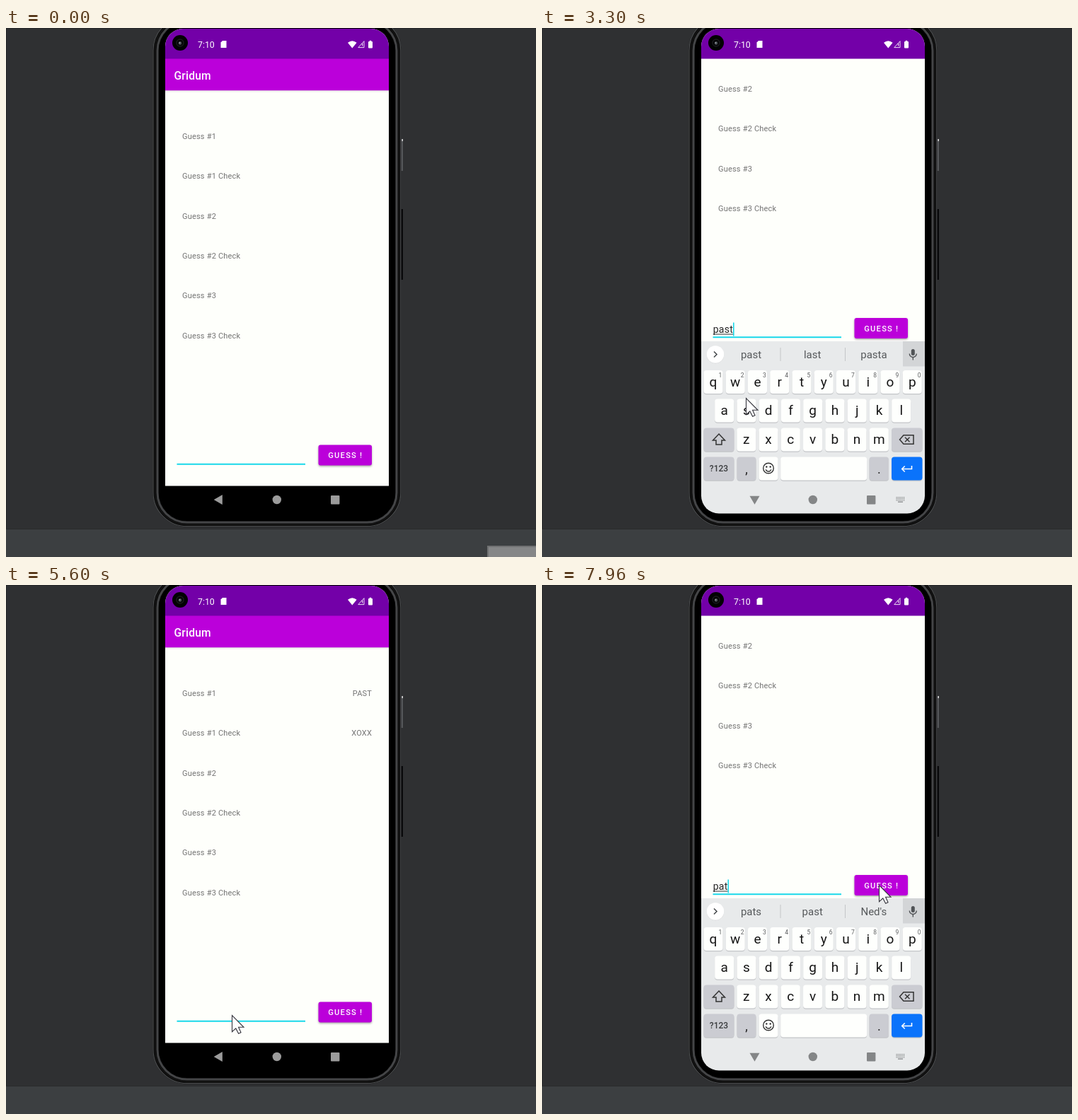
An HTML page with a canvas for the animation above (8 s loop, 749 px wide and 748 px high).

```html
<!DOCTYPE html>
<html lang="en">
<head>
<meta charset="utf-8">
<title>Word game on a phone</title>
<style>
html, body { margin: 0; width: 100%; height: 100%; overflow: hidden; background: #2f3032; }
canvas { display: block; width: 749px; height: 748px; }
</style>
</head>
<body>
<canvas id="stage" width="749" height="748"></canvas>
<script>
const LOOP = 8000, PAN = 179.5, PAN_MS = 250, KB_MS = 310, KB_TOP = 443, KB_H = 245;
const PURPLE = '#bb00da';
const stage = document.getElementById('stage').getContext('2d');
const kbCanvas = document.createElement('canvas');
kbCanvas.width = 749;
kbCanvas.height = KB_H;
const kbCtx = kbCanvas.getContext('2d');
let g = stage;

// Stepped state: [time, value]
const typed = [[0, ''], [1400, 'p'], [1500, 'pa'], [1870, 'pas'], [3070, 'past'],
  [4130, ''], [6410, 'p'], [6480, 'pa'], [6720, 'pat']];
const composed = [[0, 0], [1650, 2], [1870, 3], [3300, 4], [4130, 0], [6520, 2], [6920, 3]];
const caret = [[0, 0], [320, 1], [820, 0], [1180, 1], [2410, 0], [3070, 1], [3600, 0], [4130, 1],
  [4650, 0], [5120, 1], [5600, 0], [6410, 1], [7450, 0], [7940, 1]];
const strip = [[0, 'tools'], [1650, 'pa|past|part'], [1870, 'pas|past|part'], [2120, 'past|pass|pas'],
  [3300, 'past|last|pasta'], [4130, ''], [4420, 'tools'], [6410, ''], [6520, 'pa|past|part'],
  [6920, 'pat|past|part'], [7180, "pats|past|Ned's"]];
// Pointer moves: start, end, from, to
const moves = [[30, 850, 752, 746, 253, 596], [2410, 2700, 253, 596, 288, 523],
  [3600, 3930, 288, 523, 462, 431], [4420, 5220, 462, 431, 319, 608], [7410, 7960, 319, 608, 476, 424]];
const taps = [[1010, 1250, 253, 596], [3990, 4130, 462, 431], [5630, 5760, 319, 608]];
const shows = [1400, 5757], HIDE = 4177, HIDDEN = 4420;

const clamp = v => Math.max(0, Math.min(1, v));
const ramp = (t, a, b) => clamp((t - a) / (b - a));
const smooth = v => v * v * (3 - 2 * v);
const half = v => Math.round(v * 2) / 2;
const at = (list, t) => list.reduce((v, s) => t >= s[0] ? s[1] : v, list[0][1]);

function rect(x, y, w, h, color, r = 0) {
  g.fillStyle = color;
  g.beginPath();
  g.roundRect(x, y, w, h, r);
  g.fill();
}
function disc(x, y, r, color) {
  g.fillStyle = color;
  g.beginPath();
  g.arc(x, y, r, 0, 7);
  g.fill();
}
function poly(points, fill, stroke, width = 1, closed = true) {
  g.beginPath();
  for (let i = 0; i < points.length; i += 2) g.lineTo(points[i], points[i + 1]);
  if (closed) g.closePath();
  if (fill) { g.fillStyle = fill; g.fill(); }
  if (stroke) { g.strokeStyle = stroke; g.lineWidth = width; g.stroke(); }
}
function outline(x, y, w, h, r, color, width) {
  g.strokeStyle = color;
  g.lineWidth = width;
  g.beginPath();
  g.roundRect(x, y, w, h, r);
  g.stroke();
}
function ring(x, y, r, color, width, a = 0, b = 7) {
  g.strokeStyle = color;
  g.lineWidth = width;
  g.beginPath();
  g.arc(x, y, r, a, b);
  g.stroke();
}
function text(s, x, y, size, color, { weight = 400, align = 'left', gap = 0 } = {}) {
  g.font = `${weight} ${size}px Roboto, sans-serif`;
  g.letterSpacing = gap + 'px';
  g.textAlign = align;
  g.fillStyle = color;
  g.fillText(s, x, y);
}

function drawPhone() {
  rect(0, 0, 749, 748, '#2f3032');
  rect(0, 0, 749, 1, '#252628');
  rect(0, 0, 1, 709, '#252628');
  rect(0, 709, 749, 39, '#3c3f41');
  rect(0, 708, 749, 1, '#292b2c');
  rect(558, 157, 3, 45, '#55575a');
  rect(559.5, 157, 1.5, 3, '#ddd');
  rect(558, 256, 3, 100, '#08080a');
  rect(207.3, -17, 351.2, 722.5, '#0b0b0b', 49);
  outline(208, -16.3, 349.8, 721, 48, '#4b4d4f', 1.2);
  outline(210.5, -14, 345, 716, 46, '#131313', 2);
  outline(214, -10, 338, 709, 42, '#444547', 3);
  rect(216, -8, 334, 705, '#000', 40);
}

function drawStatus() {
  rect(225, 0, 316, 43.6, '#7300a8');
  disc(246, 21, 11, '#020203');
  ring(246, 21, 5, '#18191c', 1.5);
  disc(246, 21.5, 2.4, '#41464b');
  disc(245.5, 21, 1, '#9a9fa4');
  text('7:10', 271, 28, 12.3, '#fff');
  poly([306, 18, 311.5, 18, 311.5, 28, 303.5, 28, 303.5, 20.5], '#fff');
  g.fillStyle = '#fff';
  g.beginPath();
  g.moveTo(489.3, 28.5);
  g.lineTo(483, 20.8);
  g.quadraticCurveTo(489.3, 15.6, 495.6, 20.8);
  g.fill();
  poly([497.8, 27.6, 506, 27.6, 506, 18.6], null, '#eadcf2', 1);
  rect(503.2, 22, 1, 3.5, '#fff');
  rect(512, 19, 6, 9.5, '#fff', 1);
  rect(513.7, 17.8, 2.6, 2, '#fff');
}

function drawApp(t, pan) {
  const value = at(typed, t), grey = '#747474';
  g.save();
  g.translate(0, pan);
  rect(225, 0, 316, 647.5, '#fefffb');
  rect(225, 88, 316, 1.3, '#dcd9dc');
  rect(225, 89.3, 316, 1.5, '#f3f2f1');
  rect(225, 43, 316, 45.3, PURPLE);
  text('Gridum', 237.5, 72.5, 15.6, '#fff', { weight: 500, gap: .2 });
  const rowY = i => 156.7 + i * 56.4;
  for (let i = 0; i < 6; i++) {
    const label = `Guess #${(i >> 1) + 1}${i % 2 ? ' Check' : ''}`;
    text(label, 249, rowY(i), 11, grey, { gap: .2 });
  }
  if (t >= 4130) {
    text('PAST', 517, rowY(0), 11, grey, { align: 'right', gap: .2 });
    text('XOXX', 517, rowY(1), 11, grey, { align: 'right', gap: .2 });
  }
  rect(241.5, 615.8, 181.5, 2, '#18d8ea');
  text(value, 241.7, 610.3, 14, '#272727', { gap: .3 });
  const width = n => n ? g.measureText(value.slice(0, n)).width : 0;
  rect(241.7, 612, width(at(composed, t)), 1, '#333');
  if (at(caret, t)) rect(241.5 + width(value.length), 596, 1.6, 19, '#18d8ea');
  g.save();
  g.shadowColor = 'rgba(0,0,0,.35)';
  g.shadowBlur = 3;
  g.shadowOffsetY = 1.5;
  rect(441.5, 589.5, 75.5, 29, PURPLE, 3);
  g.restore();
  const ripple = ramp(t, 4000, 4100) * (1 - ramp(t, 4250, 4500));
  if (ripple) rect(441.5, 589.5, 75.5, 29, `rgba(255,255,255,${.2 * ripple})`, 3);
  text('GUESS !', 455.3, 608.3, 11.2, '#fff', { weight: 500, gap: 1.2 });
  g.restore();
}

function key(x, cy, w, color = '#fefffd') {
  rect(x, cy - 15, w, 32.7, '#c3c5c8', 4);
  rect(x, cy - 16.5, w, 33, color, 4);
}
function letters(row, x0, cy, digits) {
  [...row].forEach((c, i) => {
    const cx = x0 + i * 31.25;
    key(cx - 13.5, cy, 27);
    text(c, cx, cy + 6, 19, '#161616', { align: 'center' });
    if (digits) text((i + 1) % 10, cx + 10, cy - 6.5, 8.5, '#5c5e60', { align: 'center' });
  });
}

function drawTools(y, ink) {
  outline(280, y - 6, 12.5, 12.5, 2, ink, 1.5);
  disc(284, y - 1.5, 1.1, ink);
  disc(288.7, y - 1.5, 1.1, ink);
  ring(286.3, y, 3.2, ink, 1.2, .3, 2.8);
  poly([288, y + 7.5, 288, y + 2.5, 293.5, y + 2.5], ink);
  text('GIF', 331.5, y + 4.2, 11.5, ink, { weight: 700, align: 'center', gap: .7 });
  outline(371.7, y - 5.8, 11.6, 12.3, 1, ink, 1.4);
  rect(374.5, y - 7.5, 6, 4, ink, 1);
  for (const d of [-1, 1.3, 3.6]) rect(374, y + d, 7, 1.1, ink);
  ring(423, y, 4, ink, 2.8);
  for (let i = 0; i < 6; i++) {
    const a = i * Math.PI / 3 + Math.PI / 6, c = Math.cos(a), s = Math.sin(a);
    poly([423 + c * 4, y + s * 4, 423 + c * 7, y + s * 7], null, ink, 3, false);
  }
  rect(450.5, y - 9, 1, 18, '#c3c5c8');
  for (const d of [-5, 0, 5]) disc(479 + d, y, 1.6, ink);
}

function drawKeyboard(t) {
  const ink = '#505356', mode = at(strip, t), y = 18.5, dark = '#cbccd2';
  g = kbCtx;
  g.clearRect(0, 0, 749, KB_H);
  rect(225, 0, 316, KB_H, '#e8eaeb');
  rect(510, 0, 31, 35.5, '#d3d5d7');
  rect(521.8, y - 7.5, 5, 9, ink, 2.5);
  ring(524.3, y - 1, 5, ink, 1.4, 0, Math.PI);
  rect(523.6, y + 4, 1.4, 4, ink);
  disc(245, y + .7, 12.2, '#d6d8da');
  disc(245, y, 12.2, '#fff');
  const dir = mode === 'tools' ? 1 : -1;
  poly([245 + 2 * dir, y - 4, 245 - 2 * dir, y, 245 + 2 * dir, y + 4], null, '#44474a', 1.5, false);
  if (mode === 'tools') drawTools(y, ink);
  else if (mode) {
    mode.split('|').forEach((w, i) =>
      text(w, 295.5 + i * 86.7, y + 5.6, 15, '#56595b', { align: 'center' }));
    rect(336.5, 9, 1, 19, '#c3c5c8');
    rect(428, 9, 1, 19, '#c3c5c8');
  }
  letters('qwertyuiop', 242, 57.5, true);
  letters('asdfghjkl', 257.7, 98);
  letters('zxcvbnm', 288.8, 139);

  key(228.5, 139, 43, dark);
  poly([250, 131, 258.5, 140, 254, 140, 254, 146, 246, 146, 246, 140, 241.5, 140], null, '#333', 1.5);
  key(494, 139, 43.5, dark);
  poly([505.5, 139, 511, 132.8, 525, 132.8, 525, 145.2, 511, 145.2], null, '#333', 1.5);
  poly([513, 135.8, 519.5, 142.2], null, '#333', 1.5, false);
  poly([519.5, 135.8, 513, 142.2], null, '#333', 1.5, false);

  const r = 180;
  key(228.5, r, 43, dark);
  text('?123', 250, r + 4.3, 12, '#3a3c3e', { weight: 500, align: 'center' });
  key(275.5, r, 27, dark);
  text(',', 289, r + 7, 18, '#222', { align: 'center' });
  key(306.5, r, 27);
  ring(320, r - .5, 7.3, '#333', 1.4);
  disc(317.3, r - 2.5, 1.2, '#333');
  disc(322.7, r - 2.5, 1.2, '#333');
  ring(320, r, 4, '#333', 1.4, .3, 2.84);
  key(337.2, r, 122);
  key(462.5, r, 27.5, dark);
  text('.', 476.3, r + 7, 18, '#222', { align: 'center' });
  key(494, r, 43.5, '#0a73fb');
  poly([522.5, r - 4, 522.5, r + .5, 509, r + .5], null, '#fff', 1.6, false);
  poly([512.7, r - 3.5, 508.7, r + .5, 512.7, r + 4.5], null, '#fff', 1.6, false);
  g = stage;
}

function drawNav(turn, light, kbIcon) {
  const color = light ? '#848687' : '#9b9b9b';
  g.save();
  g.translate(300.5, 667);
  g.rotate(-turn * Math.PI / 2);
  poly([-6.8, 0, 5.3, -7, 5.3, 7], color);
  g.restore();
  disc(382.8, 667, 6.2, color);
  rect(459, 661, 12.4, 12.4, color, 1);
  g.globalAlpha = kbIcon;
  for (let row = 0; row < 3; row++)
    for (let i = 0; i < 6; i++) rect(500.5 + i * 2.1, 663 + row * 2.1, 1.2, 1.2, color);
  rect(503, 669.5, 7, 1.2, color);
  g.globalAlpha = 1;
}

function drawPointer(t) {
  let pos = null;
  for (const [a, b, x0, y0, x1, y1] of moves) {
    if (t < a) break;
    const k = smooth(ramp(t, a, b));
    pos = [x0 + (x1 - x0) * k, y0 + (y1 - y0) * k];
  }
  for (const [a, b, x, y] of taps) {
    if (t < a || t >= b) continue;
    disc(x, y, 17.5, 'rgba(130,130,130,.22)');
    ring(x, y, 17, 'rgba(110,110,110,.2)', 1);
  }
  if (!pos) return;
  g.save();
  g.translate(...pos);
  poly([.5, .5, .5, 23.7, 5.8, 18.9, 9.6, 26.3, 13, 24.7, 9.6, 17.3, 17, 17.3], '#fff', '#34343c', 1.1);
  g.restore();
}

// Window pan, keyboard offset and opacity, navigation bar state
function pose(t) {
  const start = t >= shows[1] ? shows[1] : shows[0];
  const panLeft = from => (1 - ramp(t, from, from + PAN_MS)) ** 3.63;
  if (t < shows[0] || (t >= HIDDEN && t < shows[1])) return { pan: 0, alpha: 0, turn: 0, icon: 0 };
  if (t >= HIDE && t < HIDDEN) {
    const k = ramp(t, 4183, 4390);
    return {
      pan: -half(PAN * panLeft(HIDE)), drop: 243 * k * k, alpha: 1 - k,
      turn: 1 - smooth(ramp(t, 4170, 4340)), icon: 0
    };
  }
  return {
    pan: -half(PAN * (1 - panLeft(start))),
    drop: 243 * (1 - ramp(t, start, start + KB_MS)) ** 4.1, alpha: 1,
    turn: smooth(ramp(t, start + 130, start + 225)), icon: ramp(t, start + 90, start + 170)
  };
}

function draw(t) {
  const p = pose(t);
  drawPhone();
  if (t < 30) {
    rect(680, 732, 69, 16, '#707172');
    rect(682, 734, 67, 14, '#858687');
  }
  g.save();
  g.beginPath();
  g.roundRect(225, 1, 316, 685.5, 25);
  g.clip();
  drawApp(t, p.pan);
  drawStatus();
  if (p.alpha) {
    drawKeyboard(t);
    g.globalAlpha = p.alpha;
    g.drawImage(kbCanvas, 0, Math.round(KB_TOP + p.drop));
    g.globalAlpha = 1;
  }
  drawNav(p.turn, p.alpha > .5, p.icon);
  g.restore();
  drawPointer(t);
}

const began = performance.now();
function frame() {
  draw((performance.now() - began) % LOOP);
  requestAnimationFrame(frame);
}
frame();
</script>
</body>
</html>
```
